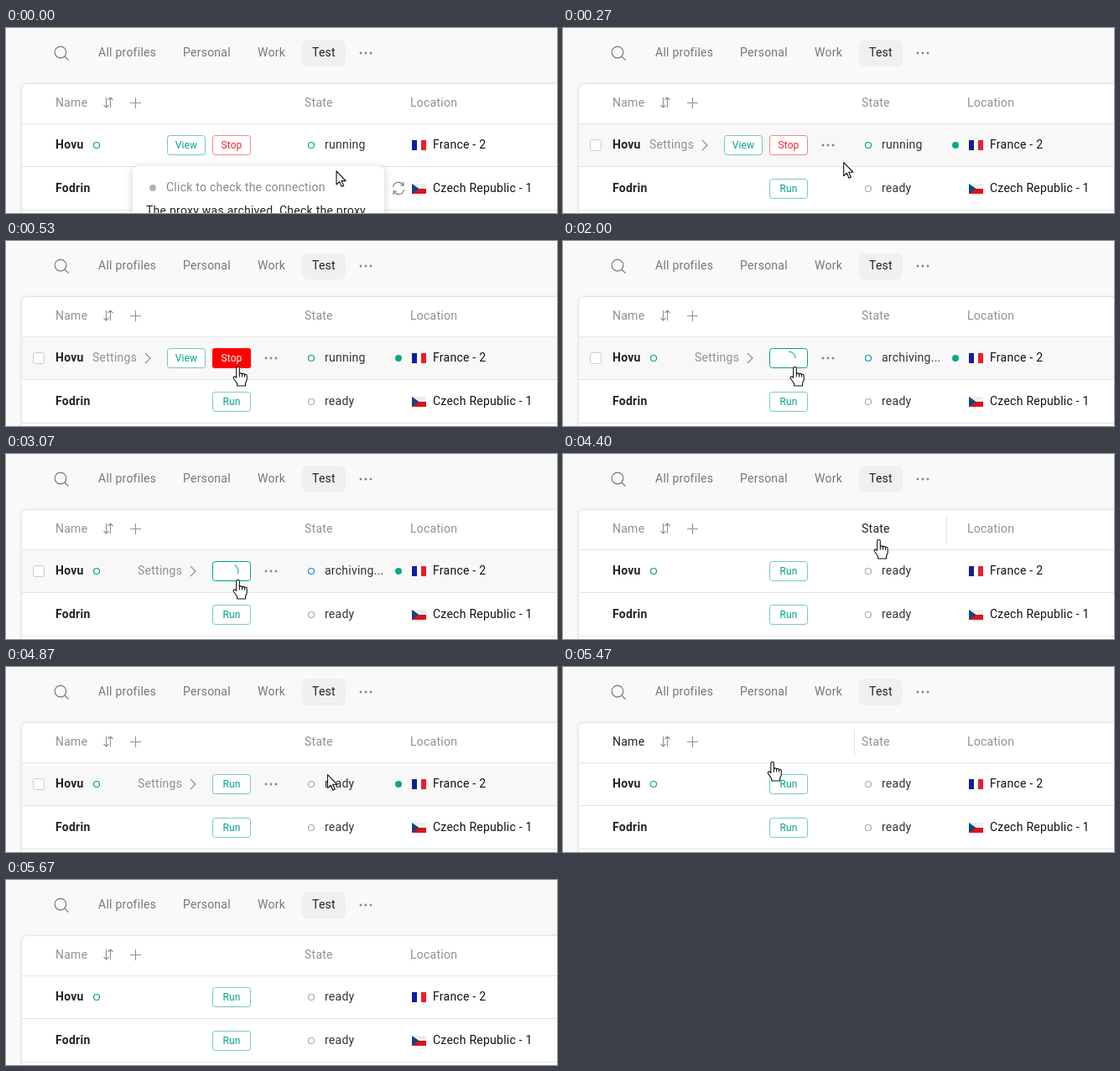
An HTML page that plays this animation: 657 by 221 pixels, repeating every 6.2 s.

```html
<!DOCTYPE html>
<html lang="en">
<head>
<title>Profile list</title>
<style>
  html, body { margin: 0; width: 100%; height: 100%; overflow: hidden; background: #f9f9f9; }
  svg { display: block; font: 14px Roboto, sans-serif; letter-spacing: .25px; }
</style>
</head>
<body>
<svg id="stage" width="657" height="221" viewBox="0 0 657 221"></svg>
<script>
const LOOP = 6200, STEP = 200 / 3;
const TEAL = '#00a38b', RED = '#f5222d', GRAY = '#8f8f98', DARK = '#222', LINE = '#e4e4e4';
const stage = document.getElementById('stage');

const clamp = v => Math.max(0, Math.min(1, v));
const mix = (a, b, p) => a + (b - a) * p;
const text = (x, y, s, fill, extra = '') => `<text x="${x}" y="${y}" fill="${fill}" ${extra}>${s}</text>`;
const rect = (x, y, w, h, fill, extra = '') =>
  `<rect x="${x}" y="${y}" width="${w}" height="${h}" fill="${fill}" ${extra}/>`;
const path = (d, stroke, width = 1.1, extra = '') =>
  `<path d="${d}" fill="none" stroke="${stroke}" stroke-width="${width}" ${extra}/>`;
const disc = (x, y, r, fill) => `<circle cx="${x}" cy="${y}" r="${r}" fill="${fill}"/>`;
const ring = (x, y, color, r = 3.5) =>
  `<circle cx="${x}" cy="${y}" r="${r}" fill="none" stroke="${color}" stroke-width="1.2"/>`;
const dots = (x, y) => [-6, 0, 6].map(d => disc(x + d, y, 1.4, '#858585')).join('');

function button(x, y, label, color, hot = 0, fill = color) {
  return rect(x + .5, y - 11.5, 45, 23, '#fff', `rx="3" stroke="${color}" stroke-opacity="${hot ? 1 : .55}"`) +
    rect(x, y - 12, 46, 24, fill, `rx="3" opacity="${hot}"`) +
    text(x + 23, y + 4, label, hot > .5 ? '#fff' : color, 'font-size="12" text-anchor="middle" letter-spacing=".1"');
}

function spinner(y, t) {
  const turn = (t - 2000) / 1000 * 360;
  return rect(246.5, y - 11.5, 45, 23, '#fff', `rx="3" stroke="${TEAL}"`) +
    path(`M269 ${y - 8}a8 8 0 0 1 8 8`, TEAL, 1.4, `opacity=".7" transform="rotate(${turn} 269 ${y})"`);
}

// Cursor stops: time, x, y
const stops = [
  [0, 394, 171], [530, 276.5, 150.5], [4140, 276.5, 150.5], [4400, 376.5, 102.5],
  [4800, 380, 125], [5070, 403, 148.5], [5270, 403, 148.5], [5470, 249.5, 113.5], [5600, 487, 204]
];
function pointer(t) {
  if (t > 5650) return null;
  const i = stops.findIndex(s => s[0] >= t);
  const b = stops[i < 0 ? stops.length - 1 : Math.max(1, i)];
  const a = stops[stops.indexOf(b) - 1];
  const p = clamp((t - a[0]) / (b[0] - a[0]));
  const e = p * p * (3 - 2 * p);
  return { x: mix(a[1], b[1], e), y: mix(a[2], b[2], e) };
}

function cursor({ x, y }, hand) {
  const d = hand
    ? 'M-1.8 13V1.6a1.8 1.8 0 0 1 3.6 0V8.4c.4-1.5 3-1.4 3.2 .4c.4-1.4 2.8-1.2 3 .6c.5-1.2 2.7-.8 2.7 1.2V15.5L9 19.5V22.5H-.8V20L-5 13.8C-6.4 11.5-3.6 10.2-1.8 13ZM1.8 8.4V12M5 8.8V12M8 9.4V12'
    : 'M0 0V16L3.7 12.6L6.3 18.5L8.7 17.5L6.1 11.6H11.2Z';
  return `<path d="${d}" transform="translate(${x} ${y})" fill="#fff" stroke="#111" stroke-width="1.1" stroke-linejoin="round"/>`;
}

const flag = {
  fr: y => rect(484, y, 17, 12, '#fff') + rect(484, y, 6, 12, '#10209a') + rect(495, y, 6, 12, '#e8202c'),
  cz: y => rect(484, y, 17, 12, '#eee') + rect(484, y + 6, 17, 6, '#d7141a') +
    `<path d="M484 ${y}l8.5 6l-8.5 6z" fill="#11457e"/>`
};

function row(y, r) {
  let s = r.hover ? rect(19, y - 25, 638, 51, '#f8f8f8') : '';
  const live = r.state === 'running';
  s += text(59, y + 4, r.name, DARK, 'font-weight="700"');
  if (r.hover) {
    const x = live ? 103 : 157;
    s += rect(32.5, y - 6.5, 13, 13, '#fff', 'rx="2" stroke="#ccc"') +
      text(x, y + 4, 'Settings', GRAY) +
      path(`M${x + 63} ${y - 6}l6 6l-6 6`, GRAY, 1.2) +
      dots(316, y) + disc(468, y, 4, '#0aa887');
  }
  if (r.marked && !(r.hover && live)) s += ring(108, y, TEAL);
  if (live) s += button(192, y, 'View', TEAL) + button(246, y, 'Stop', r.hot ? '#f00' : RED, r.hot);
  else if (r.state === 'ready') s += button(246, y, 'Run', TEAL, r.hot);
  else s += spinner(y, r.time);
  return s + ring(364, y, r.color) + text(380, y + 4, r.state, '#333') +
    flag[r.flag](y - 6) + text(509, y + 4, r.place, '#111');
}

function tooltip() {
  const sync = path('M461.5 190a6.5 6.5 0 0 1 12-2.5M474 184v4h-4M474.5 193a6.5 6.5 0 0 1-12 2.5M462 199v-4h4', '#777');
  return sync + rect(151, 165, 300, 90, '#fff', 'rx="7" style="filter:drop-shadow(0 1px 5px #0003)"') +
    disc(175, 191, 4, '#b3b3b3') +
    text(191, 195, 'Click to check the connection', '#888') +
    text(167, 223, 'The proxy was archived. Check the proxy', DARK);
}

const frame =
  ring(65, 29, '#777', 6.8) + path('M70 34l4.5 4.5', '#777') +
  rect(353, 14, 52, 32, '#f0f0f0', 'rx="7"') +
  text(110, 34, 'All profiles', '#777') + text(211, 34, 'Personal', '#777') +
  text(300, 34, 'Work', '#777') + text(365, 34, 'Test', DARK) + dots(429, 30) +
  rect(18.5, 66.5, 660, 200, '#fff', `rx="7" stroke="${LINE}" style="filter:drop-shadow(0 0 2px #0001)"`) +
  path('M119.5 83v12M116.5 92l3 3l3-3M124.5 95v-12M121.5 86l3-3l3 3M148 89.5h13M154.5 83v13', GRAY);
const lines = path('M19 114.5H657M19 165.5H657M19 217.5H657', LINE, 1);

function draw(t) {
  const c = pointer(t);
  const tip = c && t < 300 && c.y > 165;
  const over = (a, b) => !!c && !tip && c.y >= a && c.y < b;
  const head = over(67, 115) ? (c.x < 347 ? 'Name' : c.x < 458 ? 'State' : 'Location') : '';
  const onButton = y => over(y - 12, y + 12) && c.x >= 246 && c.x < 292;

  const state = t < 1990 ? 'running' : t < 3570 ? 'archiving...' : 'ready';
  const p = clamp((t - 1930) / 200);
  const color = state === 'running' ? TEAL : state === 'ready' ? '#aaa'
    : `rgb(${mix(0, 32, p)},${mix(163, 128, p)},${mix(139, 235, p)})`;
  const fade = state === 'ready' ? clamp((t - 3530) / 330) : 1;

  let s = frame;
  [['Name', 59], ['State', 356], ['Location', 482]].forEach(([n, x]) => s += text(x, 94, n, n === head ? DARK : GRAY));
  if (head === 'Name' || head === 'State') s += rect(head === 'Name' ? 347 : 457, 75, 1, 32, LINE);
  s += row(140, {
    name: 'Hovu', marked: true, hover: over(115, 166), hot: onButton(140) ? fade : 0,
    state, color, time: t, flag: 'fr', place: 'France - 2'
  });
  s += row(192, {
    name: 'Fodrin', hover: over(166, 218), hot: onButton(192) ? 1 : 0,
    state: 'ready', color: '#aaa', flag: 'cz', place: 'Czech Republic - 1'
  });
  s += lines;
  if (tip) s += tooltip();
  if (c) s += cursor(c, head || onButton(140) || onButton(192));
  stage.innerHTML = s;
}

const start = performance.now();
let last = -1;
function tick() {
  const elapsed = Math.max(0, performance.now() - start);
  const k = Math.floor((elapsed % LOOP + 4) / STEP) % 93;
  if (k !== last) draw((last = k) * STEP);
  requestAnimationFrame(tick);
}
tick();
</script>
</body>
</html>
```
